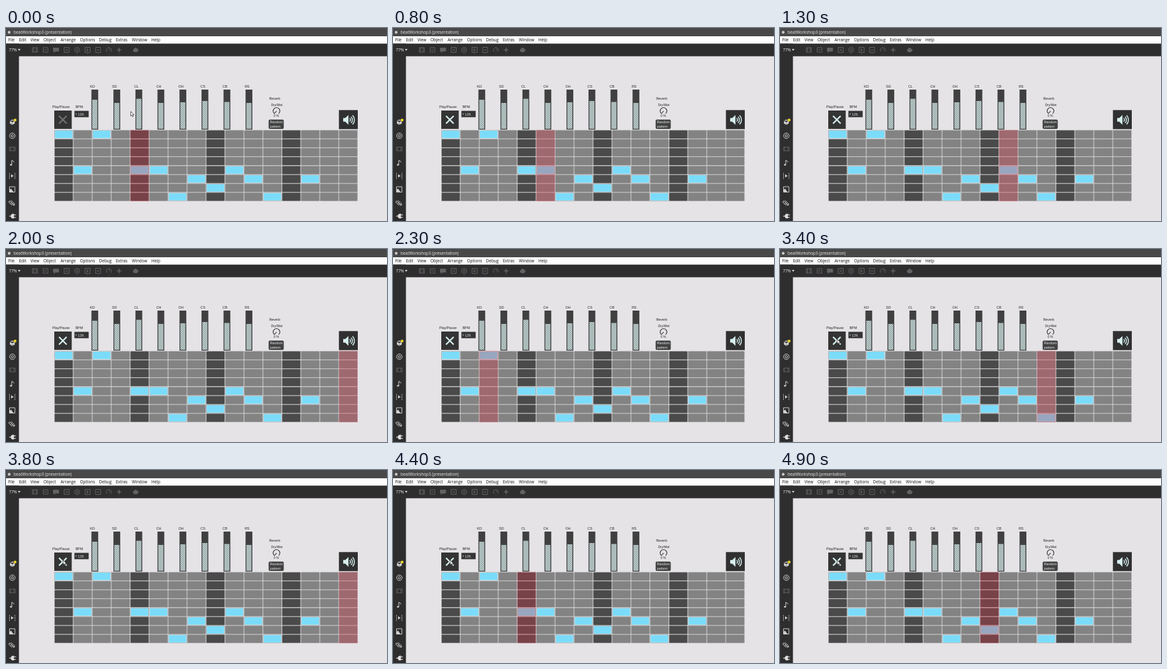
Recreate the animation shown at these times as an HTML page. Size 600x304 px, loop 5000 ms.

```html
<!DOCTYPE html>
<html lang="en">
<head>
<meta charset="utf-8">
<title>Step sequencer</title>
<style>
  html, body { margin: 0; width: 100%; height: 100%; overflow: hidden; background: #e5e3e6; }
  svg { display: block; width: 100%; height: 100%; }
  text { white-space: pre; }
  .ui { font-family: "Open Sans", "Noto Sans", sans-serif; font-size: 6.45px; }
  .lab { font-family: "Liberation Sans", Arial, sans-serif; font-size: 5.4px; fill: #222; }
  .light { fill: #e4e8e8; }
  .tools, .side { fill: none; stroke-width: 1; }
  .tools { stroke: #626163; }
  .side { stroke: #cfcfcf; }
</style>
</head>
<body>
<svg viewBox="0 0 600 304" preserveAspectRatio="none">
  <defs>
    <pattern id="hatch" width="2.2" height="2.2" patternUnits="userSpaceOnUse" patternTransform="rotate(45)">
      <rect width="2.2" height="2.2" fill="#cbdedd"/>
      <rect width=".9" height="2.2" fill="#7c8988"/>
    </pattern>
  </defs>

  <!-- window frame -->
  <rect width="600" height="304" fill="#e5e3e6"/>
  <rect width="600" height="13" fill="#494849"/>
  <rect y="13" width="600" height="12" fill="#fdfdfd"/>
  <rect y="24.6" width="600" height="19.9" fill="#2f2e2f"/>
  <rect y="24.6" width="20.4" height="279.4" fill="#2f2e2f"/>
  <circle cx="5" cy="6.700" r="2.200" fill="#c8c8c8"/>
  <text class="ui" x="12" y="9" fill="#ececec">beatWorkshop3 (presentation)</text>
  <g id="menu" class="ui" fill="#111"></g>
  <text class="ui" x="4.500" y="36.600" fill="#ececec">77%</text>
  <path d="M18.800 33h4l-2 3z" fill="#dcdcdc"/>

  <g class="tools">
    <path d="M41.500 31h8v7h-8zM43.500 31v7M47.500 31v7"/>
    <path d="M58.500 31h7.500v7h-7.500zM60 34.500h4"/>
    <path d="M74.500 31.500h8.500v5h-5l-2 2v-2h-1.500z" fill="#626163"/>
    <path d="M91.500 30.500h8v8h-8zM93.500 32.500l4 4M97.500 32.500l-4 4"/>
    <circle cx="112" cy="34.500" r="4"/><circle cx="112" cy="34.500" r="1.500"/>
    <path d="M124.500 30.500h8v8h-8zM127.500 32.500l2.500 2l-2.500 2z"/>
    <path d="M141 30.500h8v8h-8zM143 34.500h4"/>
    <path d="M159 37.500a4 4 0 1 1 6 0M162 35.500l2-3"/>
    <path d="M178.200 31v7M174.700 34.500h7" stroke-width="1.600"/>
    <path d="M200 34.500l4-3.500l4.500 3.500l-2 3h-5zM201.500 35h6" fill="#626163"/>
    <path d="M111.500 41h1M128 41h1M144.500 41h1M161.500 41h1M177.700 41h1"/>
  </g>

  <g class="side">
    <path d="M6 146l4-2l4 2v4.500l-4 2.200l-4-2.200zM6 146l4 2l4-2M10 148v4.500" fill="#d6d6d6" stroke="#3a3a3a" stroke-width=".5"/>
    <circle cx="14.300" cy="145" r="2.300" fill="#e6cf2a" stroke="none"/>
    <circle cx="10" cy="169.700" r="4.300"/><circle cx="10" cy="169.700" r="1.800"/>
    <path d="M5.500 187.500h9v6h-9zM7.500 187.500v6M12.500 187.500v6" stroke="#5c5c5c"/>
    <path d="M9 215.500v-7q3 .5 3.500 3"/>
    <ellipse cx="7.800" cy="215.500" rx="1.700" ry="1.300" fill="#cfcfcf" stroke="none"/>
    <path d="M5.500 228.500v9M14 228.500v9" stroke-dasharray="1.500 1"/>
    <path d="M8 230.200l4 2.700l-4 2.700z" fill="#cfcfcf" stroke="none"/>
    <path d="M5.500 250h8.500v8.500h-8.500z"/>
    <path d="M6 258v-3.500l2-1.500l3.500 5z" fill="#cfcfcf" stroke="none"/>
    <path d="M13 279l-6-6a1.400 1.400 0 0 0-2 2l4.500 4.500M7.500 275l4 4M8 271.500l5.500 5.500a1.600 1.600 0 0 1-2 2.300"/>
    <path d="M5 296.300h3M12 294.300h3.500M12 298.300h3.500" stroke-width="1.300"/>
    <path d="M12.500 292.500v7.600h-1.500q-3.500-.4-3.500-3.800q0-3.400 3.500-3.800z" fill="#dedede" stroke="none"/>
  </g>

  <g id="mixer"></g>

  <!-- controls -->
  <text class="lab" x="73" y="125.800">Play/Pause</text>
  <text class="lab" x="109.500" y="125.800">BPM</text>
  <rect x="76" y="130" width="27.500" height="28.900" fill="#343434"/>
  <path id="toggle" d="M83.500 138.500l12 12M95.500 138.500l-12 12" fill="none" stroke-width="2.300"/>
  <rect x="107.700" y="130.500" width="22.500" height="10" fill="#343434"/>
  <path d="M109.700 133.600l2 1.900l-2 1.900z" fill="#8d9696"/>
  <text class="lab light" x="113.300" y="137.500">129.</text>
  <text class="lab" x="414.400" y="113">Reverb</text>
  <text class="lab" x="417.400" y="123" style="font-size:5px">Dry/Wet</text>
  <path d="M422.600 134.800a5.300 5.300 0 1 1 6.800 0M426.200 130.800l-3.400 3.700" fill="none" stroke="#2c2c2c" stroke-width="1.100"/>
  <text class="lab" x="421.500" y="139.800" style="font-size:4.700px">0 %</text>
  <rect x="413.600" y="144.200" width="23.800" height="14.800" rx="2" fill="#414141"/>
  <text class="lab light" x="415.700" y="150.400">Random</text>
  <text class="lab light" x="415.700" y="157">pattern</text>
  <rect x="524.300" y="129.300" width="29.700" height="30" fill="#303030"/>
  <path d="M531 141.800h3.300l5-4.800v15.400l-5-4.800h-3.300z" fill="#d6eeee"/>
  <path d="M541.300 142a4 4 0 0 1 0 5.400M543.500 139.800a7 7 0 0 1 0 9.800M545.700 137.600a10 10 0 0 1 0 14.200" fill="none" stroke="#d6eeee" stroke-width="1.400"/>

  <g id="grid"></g>
  <rect id="playhead" y="160.500" height="112.500" fill="#d73446" opacity=".32"/>
  <path id="cursor" d="M0 0v7.200l1.700-1.500l1.200 2.500l1.200-.6l-1.200-2.400h2.300z" fill="#fff" stroke="#111" stroke-width=".65"/>
</svg>

<script>
const $ = id => document.getElementById(id);

function add(parent, tag, attrs, label) {
  const el = document.createElementNS("http://www.w3.org/2000/svg", tag);
  for (const key in attrs) el.setAttribute(key, attrs[key]);
  if (label) el.textContent = label;
  parent.append(el);
}

const menu = { File: 3.5, Edit: 20.5, View: 38.5, Object: 59, Arrange: 86, Options: 116.6,
  Debug: 146.6, Extras: 173, Window: 198.3, Help: 229 };
for (const name in menu) add($("menu"), "text", { x: menu[name], y: 21.3 }, name);

// Channel strips: label and level line
const levels = { KD: 113, SD: 118, CL: 111.5, CH: 118, OH: 117, CS: 115, CB: 116.5, RS: 118 };
Object.entries(levels).forEach(([name, top], i) => {
  const x = 134.5 + 34.68 * i, g = $("mixer");
  add(g, "text", { class: "lab", x: 132.3 + 34.8 * i, y: 94 }, name);
  add(g, "rect", { x, y: 97, width: 10.7, height: 63, fill: "#404040" });
  add(g, "rect", { x: x + 1.3, y: top, width: 8, height: 158.8 - top, fill: "url(#hatch)" });
});

// Pattern: active columns for each row
const pattern = [[0, 2], [], [], [], [1, 4, 5, 9], [7, 10, 13], [8], [6, 11]];
const left = 76, top0 = 160.5, cw = 29.87, ch = 14.06;
add($("grid"), "rect", { x: left, y: top0, width: cw * 16, height: ch * 8, fill: "#c4c3c5" });

function cell(col, row, inset, fill) {
  add($("grid"), "rect", {
    x: left + col * cw + inset, y: top0 + row * ch + inset,
    width: cw - 2 * inset, height: ch - 2 * inset, rx: .8, fill
  });
}

pattern.forEach((on, row) => {
  for (let col = 0; col < 16; col++) {
    cell(col, row, .65, col % 4 ? "#838383" : "#4a4a4a");
    if (on.includes(col)) {
      cell(col, row, .65, "#bddfe8");
      cell(col, row, 1.5, "#7adcfa");
    }
  }
});
$("playhead").setAttribute("width", cw);

const LOOP = 5000, TICK = 100, START = 765, STEP = 60000 / 129 / 4;

// Pointer stops: time, x, y
const trips = [
  [[0, 196.5, 131.5], [200, 165, 122], [400, 112, 128], [600, 89, 142], [800, 89, 142]],
  [[2600, 98.5, 135], [2700, 97, 135.5], [3000, 90, 142], [5000, 90, 142]]
];

function pointer(t) {
  const trip = trips.find(p => t >= p[0][0] && t < p[p.length - 1][0]);
  if (!trip) return null;
  const i = trip.findIndex(p => p[0] > t);
  const [t0, x0, y0] = trip[i - 1], [t1, x1, y1] = trip[i];
  const k = (t - t0) / (t1 - t0);
  return [x0 + (x1 - x0) * k, y0 + (y1 - y0) * k];
}

function draw(now) {
  const t = Math.floor(now % LOOP / TICK) * TICK;
  const playing = t >= START;
  const col = playing ? (5 + Math.floor((t - START) / STEP)) % 16 : 4;
  $("playhead").setAttribute("x", left + col * cw);
  $("toggle").setAttribute("stroke", playing ? "#d6eeee" : "#707272");
  const at = pointer(t);
  $("cursor").setAttribute("visibility", at ? "visible" : "hidden");
  if (at) $("cursor").setAttribute("transform", `translate(${at[0]} ${at[1]})`);
}

const begin = performance.now();
function frame() {
  draw(performance.now() - begin);
  requestAnimationFrame(frame);
}
frame();
</script>
</body>
</html>
```
